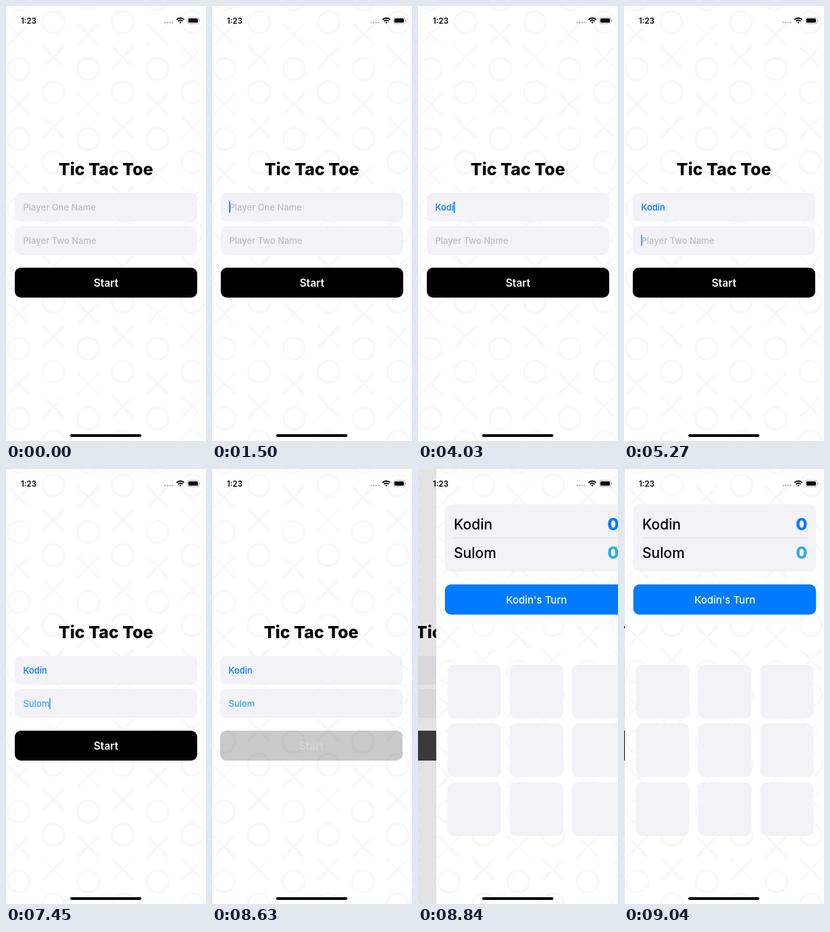
An HTML page with a canvas for the animation above (9160 ms loop, 296 by 640 pixels).

```html
<!DOCTYPE html>
<html lang="en">
<head>
<meta charset="utf-8">
<title>Tic Tac Toe</title>
<style>
html, body { margin: 0; width: 296px; height: 640px; overflow: hidden; background: #fff; }
canvas { display: block; width: 296px; height: 640px; }
</style>
</head>
<body>
<canvas id="stage"></canvas>
<script>
const W = 296, H = 640, LOOP = 9160;
const BLUE = '#007aff', CYAN = '#32ade6', PANEL = '#f2f2f7';
const PUSH = 8630, PUSH_STEP = 102.5, BLINK = 1580;

// Times in ms: when each field gets the focus, and when each letter appears.
const players = [
  { name: 'Kodin', label: 'Player One Name', color: BLUE, focus: 1440, keys: [3500, 3820, 3820, 4030, 4320] },
  { name: 'Sulom', label: 'Player Two Name', color: CYAN, focus: 4640, keys: [5500, 5780, 6130, 6420, 6830] }
];

const clamp = v => Math.min(1, Math.max(0, v));

// Critically damped spring from 0 to 1
function spring(ms) {
  const s = ms * .0187;
  return 1 - (1 + s) * Math.exp(-s);
}

// The caret stays lit after each key, then fades, and lights again every cycle.
const caretAlpha = idle => clamp(1 - (idle % BLINK - 520) / 400);

const canvas = document.getElementById('stage');
const dpr = window.devicePixelRatio || 1;
canvas.width = W * dpr;
canvas.height = H * dpr;
const c = canvas.getContext('2d');
c.scale(dpr, dpr);

function box(x, y, w, h, r, color) {
  c.fillStyle = color;
  c.beginPath();
  c.roundRect(x, y, w, h, r);
  c.fill();
}

function text(str, x, y, size, weight, color, align = 'left') {
  c.font = `${weight} ${size}px Inter, sans-serif`;
  c.fillStyle = color;
  c.textAlign = align;
  c.fillText(str, x, y);
}

function background() {
  c.fillStyle = '#fff';
  c.fillRect(0, 0, W, H);
  c.strokeStyle = 'rgba(0,0,0,.022)';
  c.lineWidth = 3.5;
  const step = 51.4, r = 16;
  for (let col = 0; col < 6; col++) {
    const x = 18.7 + col * step;
    const top = col % 2 ? 24 : -10;
    for (let row = 0; row < 14; row++) {
      const y = top + row * step;
      c.beginPath();
      if (row % 2) {
        c.moveTo(x - r, y - r);
        c.lineTo(x + r, y + r);
        c.moveTo(x + r, y - r);
        c.lineTo(x - r, y + r);
      } else {
        c.arc(x, y, r, 0, 7);
      }
      c.stroke();
    }
  }
}

function field({ name, label, color, focus, keys }, y, t, focusEnd) {
  const pressed = keys.filter(key => key <= t);
  const value = name.slice(0, pressed.length);
  box(13, y, 270, 42, 9, PANEL);
  text(value || label, 25.5, y + 26, 13, 500, value ? color : '#bebec2');
  if (t < focus || t >= focusEnd) return;
  c.globalAlpha = caretAlpha(t - Math.max(focus, ...pressed));
  box(25.2 + c.measureText(value).width, y + 12.5, 1.7, 17, .8, BLUE);
  c.globalAlpha = 1;
}

function entryPage(t, startAlpha) {
  background();
  text('Tic Tac Toe', 147.8, 249, 25, 800, '#000', 'center');
  field(players[0], 275, t, players[1].focus);
  field(players[1], 324, t, PUSH);
  c.globalAlpha = startAlpha;
  box(13, 385, 270, 44, 9, '#000');
  text('Start', 148, 412.5, 15.5, 600, '#fff', 'center');
  c.globalAlpha = 1;
}

function gamePage() {
  background();
  box(13, 52, 270, 99, 9, PANEL);
  players.forEach(({ name, color }, i) => {
    const y = 88.5 + i * 42;
    text(name, 26, y, 21, 500, '#000');
    text('0', 270.5, y + 1.5, 25, 800, color, 'right');
  });
  c.fillStyle = '#dcdcdf';
  c.fillRect(26, 101, 245, .7);
  box(12.8, 169.8, 270.4, 44.4, 9, BLUE);
  text(`${players[0].name}'s Turn`, 148.3, 197.5, 15, 500, '#fff', 'center');
  for (let i = 0; i < 9; i++) {
    box(16.8 + i % 3 * 92, 288 + Math.floor(i / 3) * 86.5, 78.7, 78.7, 9, PANEL);
  }
}

function systemBars() {
  text('1:23', 22, 25.5, 11.5, 600, '#000');
  for (let i = 0; i < 4; i++) box(234.3 + i * 3.7, 23, 2.4, 2.4, 1.2, '#bbb');
  // Wi-Fi
  c.strokeStyle = '#000';
  c.lineWidth = 1.9;
  for (const r of [8, 4.9, 1.5]) {
    c.beginPath();
    c.arc(258, 25.8, r, -Math.PI * .75, -Math.PI * .25);
    c.stroke();
  }
  // Battery
  c.strokeStyle = '#aaa';
  c.lineWidth = .8;
  c.beginPath();
  c.roundRect(268.4, 16.8, 17, 9.2, 2.6);
  c.stroke();
  box(269.8, 18.2, 14.2, 6.4, 1.5, '#000');
  box(286.2, 20, 1, 3, .5, '#aaa');
  // Home indicator
  box(95, 630, 105.5, 4, 2, '#000');
}

function draw(now) {
  const t = now % LOOP;
  const pushing = t >= PUSH;
  // The push advances in a few held steps.
  const step = Math.floor((t - PUSH) / PUSH_STEP);
  const progress = pushing ? spring(step * PUSH_STEP + 8) : 0;
  const x = Math.round(W * (1 - progress));

  c.save();
  c.translate(-Math.round((W - x) * .3), 0);
  entryPage(t, pushing ? clamp(.21 + .27 * step) : 1);
  c.restore();
  if (pushing) {
    c.fillStyle = `rgba(0,0,0,${.12 * progress})`;
    c.fillRect(0, 0, W, H);
    c.save();
    c.translate(x, 0);
    gamePage();
    c.restore();
  }
  systemBars();
}

const begin = performance.now();
function tick() {
  draw(performance.now() - begin);
  requestAnimationFrame(tick);
}
tick();
</script>
</body>
</html>
```
